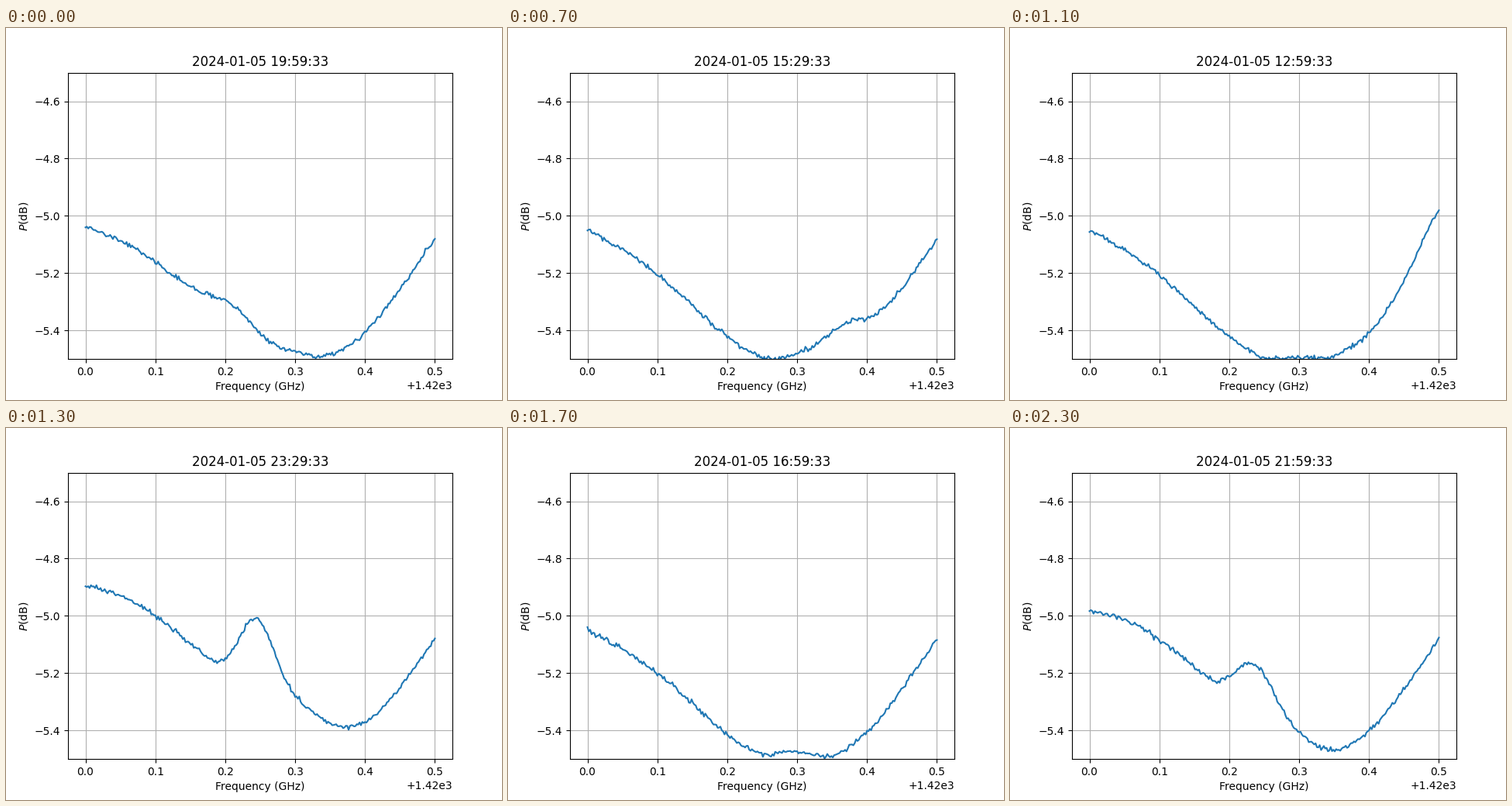
Write a matplotlib script that moves like this. It is 640 px wide and 480 px high and loops after 2.4 s.

```python
import numpy as np
import matplotlib.pyplot as plt
from matplotlib.animation import FuncAnimation

START = 12 * 60 + 59      # first sweep, minutes after midnight
STEP = 30                 # minutes between sweeps
LAST = 22                 # latest sweep, in half hours from START
QUIET = 8                 # sweep at which the passband is undisturbed
BASE = 1420.0

# Sweeps in playback order
ORDER = [14, 3, 22, 10, 17, 1, 5, 12, 20, 7, 0, 15,
         21, 9, 4, 19, 8, 13, 2, 16, 6, 11, 18]

# Quiet passband in dB, at even steps over the band
PASSBAND = [-5.052, -5.119, -5.208, -5.316, -5.422, -5.495,
            -5.494, -5.490, -5.408, -5.257, -5.080]

freq = np.linspace(0, .5, 256)


def smooth(y, at):
    """Cubic curve through values spaced evenly over the band."""
    y = np.asarray(y)
    slope = np.gradient(y)
    pos = at / freq[-1] * (len(y) - 1)
    i = np.minimum(pos.astype(int), len(y) - 2)
    t = pos - i
    return ((1 + 2 * t) * (1 - t) ** 2 * y[i] + t * (1 - t) ** 2 * slope[i]
            + t * t * (3 - 2 * t) * y[i + 1] + t * t * (t - 1) * slope[i + 1])


def logistic(x):
    return 1 / (1 + np.exp(-x))


def bell(center, width):
    return np.exp(-.5 * ((freq - center) / width) ** 2)


def pedestal(sweep):
    """Lift of the lower band, growing and spreading upwards over the day."""
    age = max(sweep - QUIET, 0) / (LAST - QUIET)
    edge = np.exp(-freq / .07)
    height = (.255 - .06 * edge) * age ** (1.6 + 1.4 * edge)
    end = .25 + .13 * np.exp(-(LAST - sweep) / 4)
    return height * logistic((end - freq) / .03)


def evening_line(sweep):
    left = LAST - sweep
    height = .34 * logistic((sweep - 17.5) / 2.8)
    return height * bell(.246 - .0005 * left ** 2, .025 + .00015 * left ** 2)


def afternoon_line(sweep):
    height = .1 * logistic((7 - sweep) / .75)
    return height * bell(.5 - .027 * sweep, .033)


def spectrum(sweep):
    noise = np.random.default_rng(100 + sweep).normal(0, .0042, freq.size)
    return (smooth(PASSBAND, freq) + pedestal(sweep) + evening_line(sweep)
            + afternoon_line(sweep) + noise)


def timestamp(sweep):
    hour, minute = divmod(START + STEP * sweep, 60)
    return f"2024-01-05 {hour:02d}:{minute:02d}:33"


fig, ax = plt.subplots(figsize=(6.4, 4.8), dpi=100)
line, = ax.plot(BASE + freq, spectrum(ORDER[0]))
title = ax.set_title(timestamp(ORDER[0]))
ax.set_ylim(-5.5, -4.5)
ax.set_xlabel("Frequency (GHz)")
ax.set_ylabel("$P$(dB)")
ax.grid(True)


def update(frame):
    # The first sweep is held for two ticks
    sweep = ORDER[max(frame - 1, 0)]
    line.set_ydata(spectrum(sweep))
    title.set_text(timestamp(sweep))
    return line, title


anim = FuncAnimation(fig, update, frames=len(ORDER) + 1, interval=100,
                     repeat=True, repeat_delay=0)
plt.show()
```
